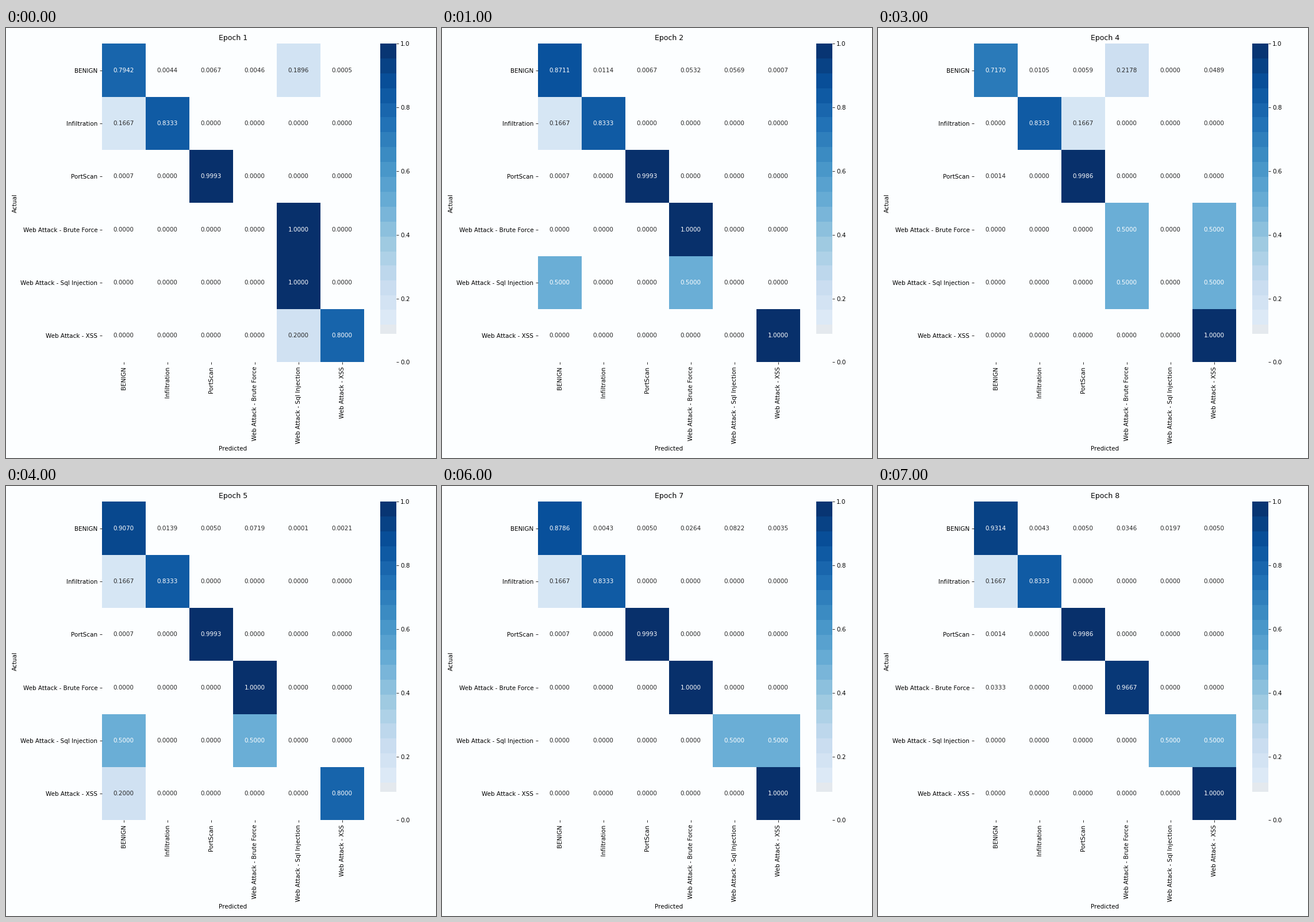
Animation of 748 by 748 pixels, one loop 8000 ms. Source, as a matplotlib script:

```python
import numpy as np
import matplotlib.pyplot as plt
from matplotlib.animation import FuncAnimation
from matplotlib.colors import ListedColormap, to_rgb

PAPER = "#fcfeff"
PALE_GREY = "#e4e9ee"
LABELS = ["BENIGN", "Infiltration", "PortScan", "Web Attack - Brute Force",
          "Web Attack - Sql Injection", "Web Attack - XSS"]
N = len(LABELS)
EPOCHS = 8
BLUES = plt.get_cmap("Blues")
CLEAR, PALE, STEPS = .09, .117, 19  # blank and grey limits, blue steps above

# Benign traffic at key epochs: kept, then taken for each web attack
BENIGN = {
    1: (.7942, .0046, .1896, .0005),
    3: (.9040, .0741, .0000, .0008),
    4: (.7170, .2178, .0000, .0489),
    5: (.9070, .0719, .0001, .0021),
    6: (.7554, .0072, .2280, .0000),
    8: (.9314, .0346, .0197, .0050),
}

# Predicted class of each brute force, SQL injection and XSS sample
ATTACKS = [
    ([4], [4], [4] + [5] * 4),
    ([3], [0, 3], [5]),
    ([3], [0], [0, 3] + [5] * 3),
    ([3, 5], [3, 5], [5]),
    ([3], [0, 3], [0] + [5] * 4),
    ([4], [4], [4]),
    ([3], [4, 5], [5]),
    ([0] + [3] * 29, [4, 5], [5]),
]


def shares(hits):
    return np.bincount(hits, minlength=N) / len(hits)


def benign_row(epoch):
    if epoch in BENIGN:
        kept, *attacks = BENIGN[epoch]
    else:
        before, after = np.array([BENIGN[epoch - 1], BENIGN[epoch + 1]])
        kept, *attacks = .3 * before + .7 * after
    scan = np.interp(epoch, [3, 5], [.0067, .0050])
    rest = 1 - kept - scan - sum(attacks)
    return [kept, rest, scan, *attacks]


def matrix(epoch):
    stray = 2 if epoch in (3, 4) else 0
    leak = .0014 if epoch % 4 == 0 else .0007
    return np.array([
        benign_row(epoch),
        shares([stray] + [1] * 5),
        [leak, 0, 1 - leak, 0, 0, 0],
        *map(shares, ATTACKS[epoch - 1]),
    ])


def cell_color(value):
    return to_rgb(PAPER if value < .1 else BLUES(float(value)))


def bar_color(value):
    if value < CLEAR:
        return to_rgb(PAPER)
    if value < PALE:
        return to_rgb(PALE_GREY)
    step = (1 - PALE) / STEPS
    middle = PALE + (np.floor((value - PALE) / step) + .5) * step
    return to_rgb(BLUES(float(middle)))


plt.rcParams["font.family"] = "DejaVu Sans"
fig, ax = plt.subplots(figsize=(10, 10), dpi=74.8, facecolor=PAPER)
ax.set_facecolor(PAPER)
ax.spines[:].set_visible(False)

mesh = ax.pcolormesh(np.ones((N, N, 3)))
centers = np.arange(N) + .5
ax.set(xlim=(0, N), ylim=(N, 0), xlabel="Predicted", ylabel="Actual")
ax.set_xticks(centers, LABELS, rotation=90)
ax.set_yticks(centers, LABELS)
title = ax.set_title("Epoch 1")
notes = [ax.text(x, y, "", ha="center", va="center")
         for y in centers for x in centers]

scale = ListedColormap([bar_color(v) for v in (np.arange(256) + .5) / 256])
bar = fig.colorbar(plt.cm.ScalarMappable(cmap=scale), ax=ax,
                   ticks=np.linspace(0, 1, 6))
bar.outline.set_linewidth(0)
fig.tight_layout()


def update(frame):
    m = matrix(frame + 1)
    title.set_text(f"Epoch {frame + 1}")
    mesh.set_array(np.array([[cell_color(v) for v in row] for row in m]))
    for note, value in zip(notes, m.flat):
        note.set_text(f"{abs(value):.4f}")
        note.set_color("white" if value > .45 else ".15")
    return [title, mesh, *notes]


anim = FuncAnimation(fig, update, frames=EPOCHS, interval=1000,
                     repeat=True, repeat_delay=0, blit=False)
plt.show()
```
